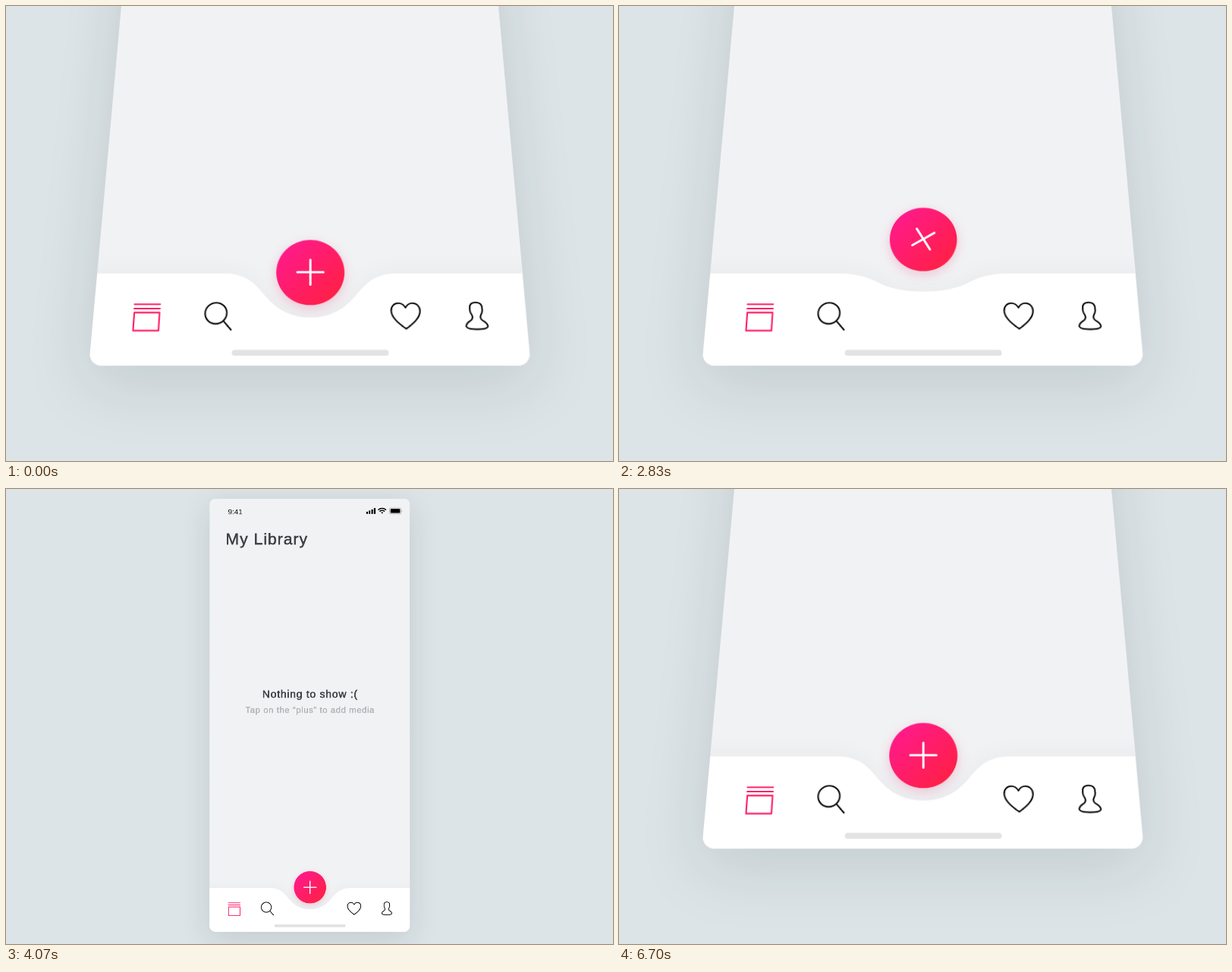
An HTML page for the animation above (7030 ms loop, 800 px wide and 600 px high).

```html
<!DOCTYPE html>
<html lang="en">
<head>
<meta charset="utf-8">
<title>Media library tab bar</title>
<style>
  html, body { margin: 0; width: 100%; height: 100%; overflow: hidden; background: #dce4e7; }
  #stage { position: relative; width: 800px; height: 600px; overflow: hidden; }
  #phone {
    position: absolute; left: 118.75px; top: -309px; width: 562.5px; height: 1218px;
    border-radius: 16px; background: #f1f2f4;
    box-shadow: 0 22px 84px rgba(20, 34, 48, .125);
  }
  svg { display: block; width: 100%; height: 100%; }
  text { font-family: "Liberation Sans", Arial, sans-serif; fill: #404145; }
  .medium { stroke: #404145; stroke-width: .75; }
  .hint { fill: #b0b1b4; stroke: #b0b1b4; stroke-width: .5; }
  .line { fill: none; stroke: #111; stroke-width: 1.4; stroke-linecap: round; stroke-linejoin: round; }
  .pink { stroke: #ff1f66; }
  .option .line { stroke: #2b2b2d; }
  #bar { filter: drop-shadow(0 -3px 9px rgba(0, 0, 0, .03)); }
  #fabDisc { filter: drop-shadow(0 3px 5px rgba(225, 20, 80, .2)); }
  .disc { fill: #fff; filter: drop-shadow(0 3px 8px rgba(0, 0, 0, .035)); }
</style>
</head>
<body>
<div id="stage"><div id="phone">
<svg viewBox="0 0 375 812">
  <defs>
    <clipPath id="screen"><rect width="375" height="812" rx="11"/></clipPath>
    <linearGradient id="hot" x1=".1" y1=".1" x2=".9" y2=".9">
      <stop stop-color="#ff1a8c"/><stop offset="1" stop-color="#ff2044"/>
    </linearGradient>
  </defs>
  <g clip-path="url(#screen)">
    <rect width="375" height="812" fill="#f1f2f4"/>

    <text x="34.3" y="29.6" font-size="14" style="fill:#111">9:41</text>
    <g fill="#000">
      <path d="M293.7 24.5h3v4h-3zM298.4 22.3h3v6.2h-3zM303.1 20h3v8.5h-3zM307.8 17.6h3v10.9h-3z"/>
      <rect x="339" y="19.4" width="18" height="7.4" rx="1.2"/>
      <path d="M360.3 21.3q1.8 1.8 0 3.8z" opacity=".4"/>
    </g>
    <rect x="337.2" y="17.5" width="21.7" height="11.2" rx="2.7" fill="none" stroke="#000" opacity=".35"/>
    <g fill="none" stroke="#000" stroke-width="2.1">
      <path d="M316 21.2a10.4 10.4 0 0 1 14.6 0M318.6 24a6.6 6.6 0 0 1 9.4 0"/>
      <path d="M321.2 25.8L323.3 28.2L325.4 25.8Q323.3 24.4 321.2 25.8Z" fill="#000" stroke="none"/>
    </g>

    <text class="medium" x="30" y="86.2" font-size="30" letter-spacing="1.45">My Library</text>
    <text class="medium" x="188.3" y="373.3" font-size="20" letter-spacing="1" text-anchor="middle">Nothing to show :(</text>
    <text class="hint" x="188.2" y="401.8" font-size="16" letter-spacing=".88" text-anchor="middle">Tap on the “plus” to add media</text>

    <g id="tabs">
      <path id="bar" fill="#fff"/>
      <path class="line pink" d="M35 758.2H57.3M35 762H57.3M35.3 765.6H57.2V781.6H35.3Z"/>
      <g class="line">
        <circle cx="106.2" cy="766.2" r="9.4"/><path d="M112.9 773.1L119.6 780.8"/>
        <path d="M270.8 780C265 775.6 258.3 770.4 258.3 764C258.3 760 261 757.2 264.6 757.2C267.4 757.2 269.5 758.8 270.8 761.2C272.1 758.8 274.2 757.2 277 757.2C280.6 757.2 283.3 760 283.3 764C283.3 770.4 276.6 775.6 270.8 780Z"/>
        <path transform="translate(332 0)" d="M0 756.5C4 756.5 5.6 758.6 5.3 762C5.8 764.4 5 766 4 767.6C3.2 769.2 3.4 771 4.6 772.2C6.5 773.8 9.3 775 9.3 777.5C9.3 780 5 780.4 0 780.4C-5 780.4 -9.3 780 -9.3 777.5C-9.3 775 -6.5 773.8 -4.6 772.2C-3.4 771 -3.2 769.2 -4 767.6C-5 766 -5.8 764.4 -5.3 762C-5.6 758.6 -4 756.5 0 756.5Z"/>
      </g>
    </g>

    <rect x="121" y="798.4" width="134" height="5.1" rx="2.55" opacity=".11"/>

    <g class="option">
      <circle class="disc" r="32"/>
      <path class="line" d="M-10.5 -7.9H12V9.3H-10.5ZM-2.6 -9.9H4.6"/>
      <circle class="line" cx=".7" cy=".9" r="5.3"/>
    </g>
    <g class="option">
      <circle class="disc" r="32"/>
      <path class="line" d="M-12 -4.3H6V8.5H-12ZM-11.8 -7.6H2.6V-4.5M6 -1.5L12 -4.7V9L6 5.8"/>
    </g>
    <g class="option">
      <circle class="disc" r="32"/>
      <rect class="line" x="-4.4" y="-12" width="9" height="20" rx="4.5"/>
      <path class="line" d="M-7.4 .2V3.2A7.5 7.5 0 0 0 7.6 3.2V.2M.1 10.7V13.5M-3 13.5H3.4"/>
    </g>
    <g class="option">
      <circle class="disc" r="32"/>
      <path class="line" d="M-4.7 8.2V-9.7L8.3 -11.4V4.2M-4.7 -4.3L8.3 -6.8"/>
      <circle class="line" cx="-8.7" cy="8.2" r="4"/><circle class="line" cx="4.3" cy="4.2" r="4"/>
    </g>

    <g id="fab">
      <circle id="fabDisc" r="30.1" fill="url(#hot)"/>
      <path id="cross" d="M-11.5 0H11.5M0 -11.5V11.5" stroke="#fff" stroke-width="2" stroke-linecap="round"/>
    </g>
  </g>
</svg>
</div></div>
<script>
  const LOOP = 7030, MID = 188.1, CAMERA = 1111;
  const byId = id => document.getElementById(id);
  const phone = byId('phone'), tabs = byId('tabs'), bar = byId('bar');
  const fab = byId('fab'), disc = byId('fabDisc'), cross = byId('cross');
  const options = [...document.querySelectorAll('.option')];

  function bezier(x1, y1, x2, y2) {
    const at = (a, b, s) => 3 * (1 - s) * (1 - s) * s * a + 3 * (1 - s) * s * s * b + s * s * s;
    return x => {
      let lo = 0, hi = 1;
      for (let i = 0; i < 24; i++) {
        const m = (lo + hi) / 2;
        if (at(x1, x2, m) < x) lo = m; else hi = m;
      }
      return at(y1, y2, lo);
    };
  }
  const smooth = bezier(.42, 0, .58, 1);
  const settle = bezier(.3, 0, .2, 1);
  const zoomOut = bezier(.33, 0, .19, 1);
  const zoomIn = bezier(.74, 0, .67, 1);

  // Each step is [time, value, easing towards it].
  function track(steps) {
    return t => {
      let i = 1;
      while (i < steps.length && t >= steps[i][0]) i++;
      const [t0, v0] = steps[i - 1];
      if (i === steps.length) return v0;
      const [t1, v1, ease = smooth] = steps[i];
      return v0 === v1 ? v0 : v0 + (v1 - v0) * ease((t - t0) / (t1 - t0));
    };
  }

  const zoom = track([[0, 1], [2990, 1], [4190, 0, zoomOut], [5500, 0], [6700, 1, zoomIn]]);
  const fabY = track([[0, 728.8], [440, 759, settle], [2010, 759], [2600, 654], [3020, 728.8]]);
  const fabScale = track([[0, 1], [440, .84, settle], [2010, .84], [2500, 1]]);
  const fabTurn = track([[0, 0], [440, 45, settle], [2640, 45], [3130, 90]]);
  const tabsFade = track([[0, 1], [270, 0], [2080, 0], [2560, 1]]);
  const notch = track([[0, 1], [300, 1], [600, 0], [2650, 0], [3050, 1]]);
  const spread = [0, 50].map(d =>
    track([[0, 0], [d, 0], [450 + d, 1, settle], [2020 + d, 1], [2480 + d, 0]]));

  const places = [
    { x: -145.7, y: 738.6, open: spread[1] },
    { x: -67, y: 727, open: spread[0] },
    { x: 67, y: 727, open: spread[0] },
    { x: 145.7, y: 738.6, open: spread[1] }
  ];

  function barPath(depth) {
    const p = (x, y) => `${MID + x} ${730 + y * depth}`;
    return `M-20 730H${MID - 77}C${p(-57, 0)} ${p(-49, 9)} ${p(-40, 20)}` +
      `C${p(-30, 32)} ${p(-18, 40)} ${p(0, 40)}C${p(18, 40)} ${p(30, 32)} ${p(40, 20)}` +
      `C${p(49, 9)} ${p(57, 0)} ${p(77, 0)}H395V840H-20Z`;
  }

  function draw(t) {
    const z = zoom(t);
    const depth = z ? `perspective(${CAMERA}px) ` : '';
    const tilt = z ? ` rotateX(${20 * z}deg)` : '';
    phone.style.transform =
      `${depth}translateY(${-350 * z}px)${tilt} scale(${(.7 + .6 * z) / 1.5})`;

    tabs.style.opacity = tabsFade(t);
    bar.setAttribute('d', barPath(notch(t)));

    fab.setAttribute('transform', `translate(${MID} ${fabY(t)})`);
    disc.setAttribute('transform', `scale(${fabScale(t)})`);
    cross.setAttribute('transform', `rotate(${fabTurn(t)})`);

    options.forEach((el, i) => {
      const { x, y, open } = places[i], p = open(t);
      el.style.display = p < .001 ? 'none' : '';
      el.style.opacity = Math.min(1, p * 2.5);
      el.setAttribute('transform',
        `translate(${MID + x * p} ${752 + (y - 752) * p}) scale(${.3 + .7 * p})`);
    });
  }

  const start = performance.now();
  function tick() {
    draw((performance.now() - start) % LOOP);
    requestAnimationFrame(tick);
  }
  tick();
</script>
</body>
</html>
```
